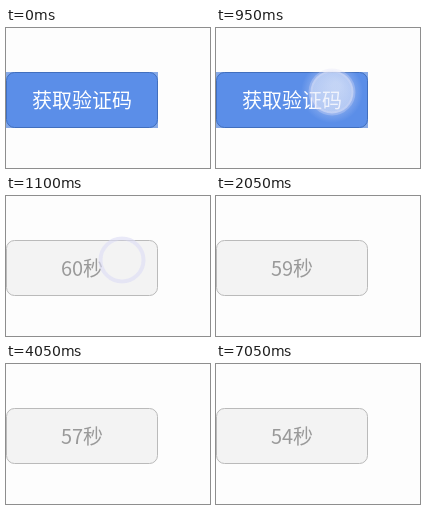
An HTML page with a canvas that plays this animation: 204 px wide and 140 px high, repeating every 7950 ms.

```html
<!DOCTYPE html>
<html lang="zh-CN">
<head>
<meta charset="utf-8">
<title>获取验证码</title>
<style>
html, body { margin: 0; width: 100%; height: 100%; overflow: hidden; background: #fdfdfd; }
canvas { display: block; }
</style>
</head>
<body>
<canvas id="stage" width="204" height="140"></canvas>
<script>
const ctx = document.getElementById('stage').getContext('2d');
const LOOP = 7950;
const PRESS = 850, SENT = 1100, CLEAR = 1150;
const TICKS = [2050, 3100, 4050, 5100, 5950, 7050];
const TOUCH = { x: 116, y: 64, r: 21.5 };

function button(fill, border, corner) {
  if (corner) {
    ctx.fillStyle = corner;
    ctx.fillRect(0, 44, 152, 56);
  }
  ctx.beginPath();
  ctx.roundRect(0.5, 44.5, 151, 55, 8);
  ctx.fillStyle = fill;
  ctx.fill();
  ctx.lineWidth = 1;
  ctx.strokeStyle = border;
  ctx.stroke();
}

function label(text, color) {
  ctx.font = '20px "Noto Sans CJK SC", "Noto Sans CJK", sans-serif';
  ctx.textAlign = 'center';
  ctx.textBaseline = 'alphabetic';
  ctx.fillStyle = color;
  ctx.fillText(text, 76, 80);
}

function ring(alpha) {
  ctx.beginPath();
  ctx.arc(TOUCH.x, TOUCH.y, TOUCH.r, 0, Math.PI * 2);
  ctx.lineWidth = 4;
  ctx.strokeStyle = `rgba(222,222,246,${alpha})`;
  ctx.stroke();
}

// Fading touch highlight: soft halo, filled disc, rim
function touch(p) {
  const { x, y, r } = TOUCH;
  const halo = ctx.createRadialGradient(x, y, r - 2, x, y, 31);
  halo.addColorStop(0, 'rgba(225,230,250,0.3)');
  halo.addColorStop(1, 'rgba(225,230,250,0)');
  ctx.save();
  ctx.beginPath();
  ctx.rect(0, 44, 152, 56);
  ctx.clip();
  ctx.fillStyle = halo;
  ctx.fillRect(x - 31, y - 31, 62, 62);
  ctx.restore();

  const a = 0.72 - 0.36 * p;
  const disc = ctx.createRadialGradient(x + 4, y - 6, 4, x, y, r);
  disc.addColorStop(0, `rgba(238,241,251,${a + 0.06})`);
  disc.addColorStop(1, `rgba(232,236,250,${a - 0.06})`);
  ctx.beginPath();
  ctx.arc(x, y, r, 0, Math.PI * 2);
  ctx.fillStyle = disc;
  ctx.fill();
  ring(0.3);
}

function draw(t) {
  ctx.fillStyle = '#fdfdfd';
  ctx.fillRect(0, 0, 204, 140);
  if (t < SENT) {
    button('#5b8ee8', '#416fbe', '#86a9e6');
    label('获取验证码', '#fff');
    if (t >= PRESS) touch((t - PRESS) / 200);
  } else {
    const left = 60 - TICKS.filter(k => t >= k).length;
    button('#f3f3f3', '#bababa');
    label(left + '秒', '#999');
    if (t < CLEAR) ring(0.62);
  }
}

function frame(now) {
  draw(Math.floor((now % LOOP) / 50) * 50);
  requestAnimationFrame(frame);
}
draw(0);
requestAnimationFrame(frame);
</script>
</body>
</html>
```
